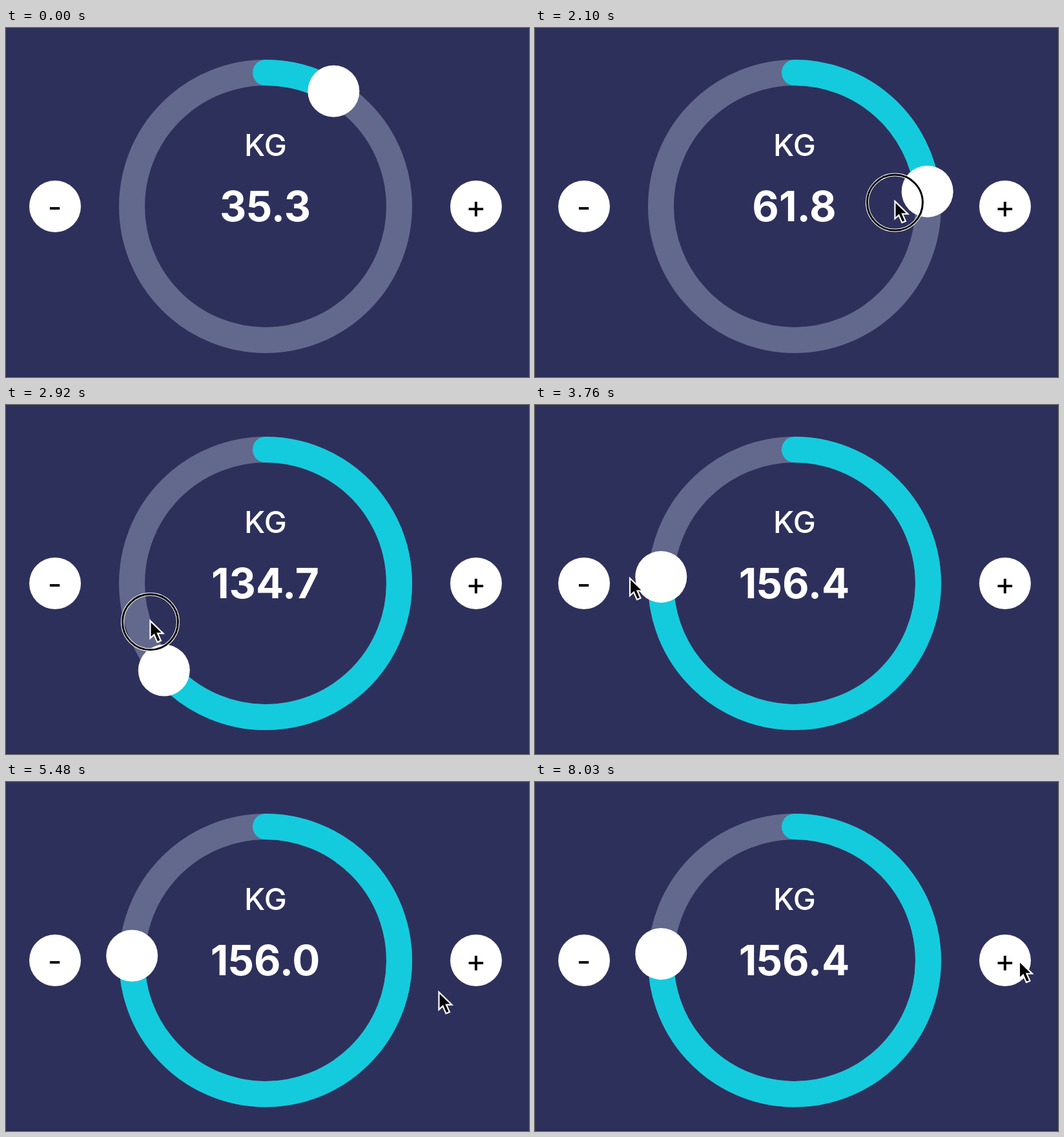
An HTML page for the animation above (8070 ms loop, 810 by 540 pixels).

```html
<!DOCTYPE html>
<html lang="en">
<head>
<meta charset="utf-8">
<title>Weight dial</title>
<style>
html, body { margin: 0; width: 100%; height: 100%; overflow: hidden; background: #2e305c; }
svg { display: block; width: 810px; height: 540px; }
text { font-family: Inter, Roboto, sans-serif; text-anchor: middle; fill: #fff; }
.sign { font-size: 48px; fill: #000; }
</style>
</head>
<body>
<svg viewBox="0 0 810 540">
  <rect width="810" height="540" fill="#2e305c"/>
  <rect y="538.5" width="810" height="1.5" fill="#28294f"/>
  <g fill="none" stroke-width="40">
    <circle cx="402" cy="276" r="207" stroke="#63698d"/>
    <path id="arc" stroke="#14cbdd" stroke-linecap="round"/>
  </g>
  <circle id="knob" r="40" fill="#fff"/>
  <circle cx="76" cy="276" r="40" fill="#fff"/>
  <circle cx="728" cy="276" r="40" fill="#fff"/>
  <text class="sign" x="75.5" y="294">-</text>
  <text class="sign" x="728" y="294">+</text>
  <text x="402" y="198.3" font-size="47" font-weight="500">KG</text>
  <text id="value" x="401.5" y="299" font-size="64" font-weight="700"></text>
  <g id="pointer">
    <g id="press" fill="none">
      <circle r="43" stroke="#fff" stroke-width="5"/>
      <circle r="43" stroke="#000" stroke-width="3"/>
    </g>
    <path d="M0-2V25L6 19.5 11 31 16.5 28.7 11.5 17.5H20Z" fill="#000" stroke="#fff" stroke-width="2.2"/>
  </g>
</svg>
<script>
const LOOP = 8070, TICK = 10;
const CX = 402, CY = 276, R = 207;
const FIRST = 35.3, LAST = 156.4;
const $ = id => document.getElementById(id);

const clamp = (v, lo, hi) => Math.min(hi, Math.max(lo, v));
const mix = (a, b, u) => a + (b - a) * u;
const smooth = u => u * u * (3 - 2 * u);
const dragEase = u => mix(u, smooth(u), 0.405);

// Pointer strokes along Bezier curves, at rest in between
const below = [480, 570], grip = [512, 107], release = [90, 261], onMinus = [90, 281], onPlus = [750, 279];
const stroke = (from, to, points, ease = smooth) => ({ from, to, points, ease });
const drag = stroke(1700, 3260, [grip, [690, 418], [321, 436], release], dragEase);
const strokes = [
  stroke(250, 1000, [below, grip]),
  drag,
  stroke(3400, 4120, [release, [204, 269], onMinus]),
  stroke(5010, 5610, [onMinus, [420, 506], onPlus])
];

// Four taps on each button, each worth 0.1
const taps = [{ first: 4290, gap: 230, step: -0.1 }, { first: 5950, gap: 450, step: 0.1 }];
const tapCount = ({ first, gap }, t) => clamp(Math.floor((t - first) / gap) + 1, 0, 4);

const progress = (s, t) => s.ease(clamp((t - s.from) / (s.to - s.from), 0, 1));

function bezier(points, u) {
  while (points.length > 1)
    points = points.slice(1).map((p, i) => p.map((v, k) => mix(points[i][k], v, u)));
  return points[0];
}

function draw(t) {
  let weight = mix(FIRST, LAST, progress(drag, t));
  for (const tap of taps) weight += tap.step * tapCount(tap, t);

  const angle = (weight - 20) * 2, a = angle * Math.PI / 180;
  const x = CX + R * Math.sin(a), y = CY - R * Math.cos(a);
  $("arc").setAttribute("d", `M${CX} ${CY - R}A${R} ${R} 0 ${+(angle > 180)} 1 ${x} ${y}`);
  $("knob").setAttribute("cx", x);
  $("knob").setAttribute("cy", y);
  $("value").textContent = weight.toFixed(1);

  const current = strokes.filter(s => t >= s.from).pop() || strokes[0];
  $("pointer").setAttribute("transform", `translate(${bezier(current.points, progress(current, t))})`);

  // A tap counts just before the button is let go
  const dragging = t >= drag.from - 100 && t < drag.to + 40;
  const tapping = taps.some(tap => tapCount(tap, t + 90) > tapCount(tap, t - 10));
  $("press").style.display = dragging || tapping ? "" : "none";
}

const start = performance.now();
function frame() {
  const t = (performance.now() - start) % LOOP;
  draw(Math.floor(t / TICK) * TICK);
  requestAnimationFrame(frame);
}
frame();
</script>
</body>
</html>
```
